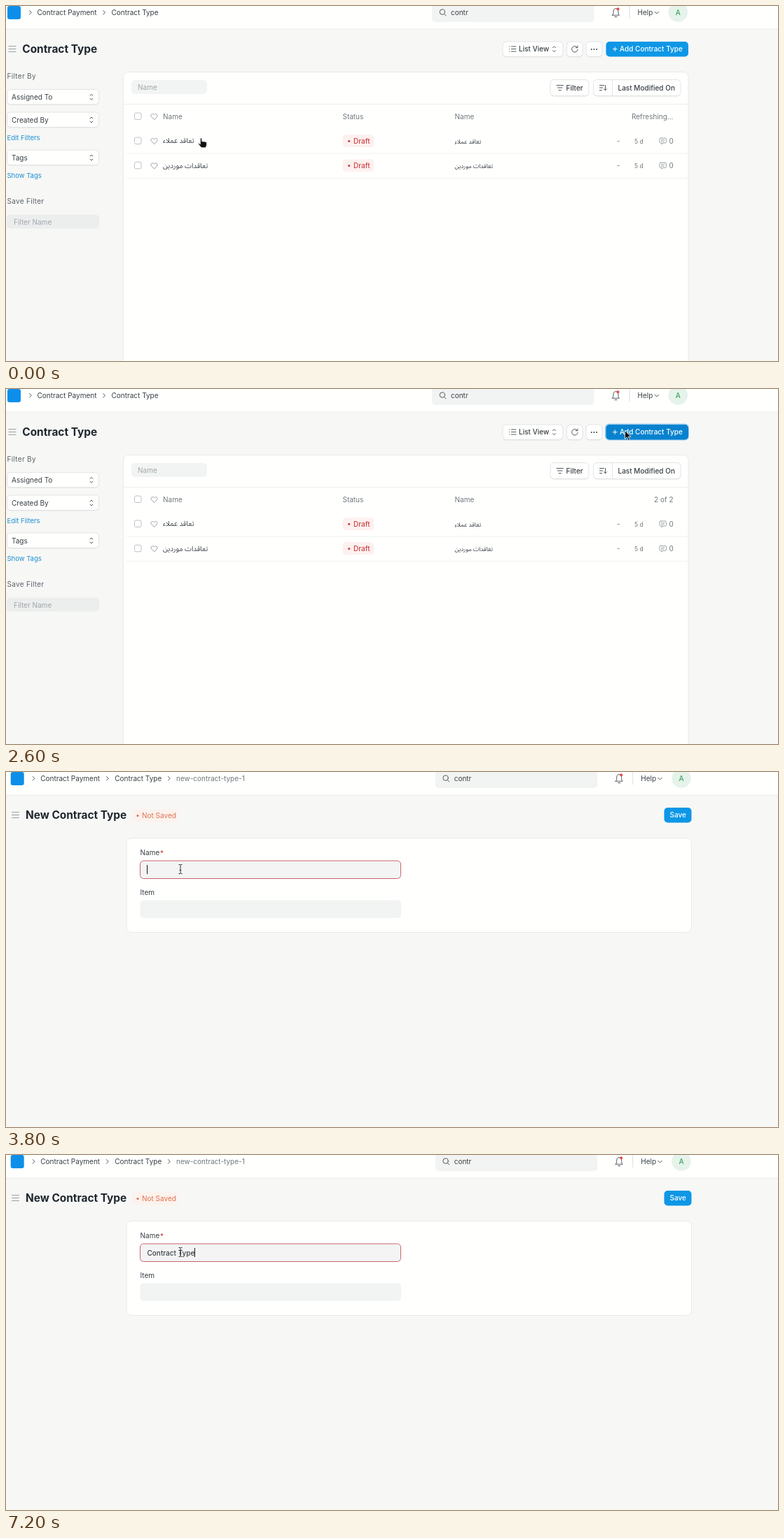
An HTML page for the animation above (8 s loop, 1102 by 508 pixels).

```html
<!DOCTYPE html>
<html lang="en">
<head>
<meta charset="utf-8">
<title>Contract Type</title>
<style>
html, body { margin: 0; width: 100%; height: 100%; overflow: hidden; background: #f7f7f6; }
svg { display: block; width: 1102px; height: 508px; }
text { font: 400 10px Inter, sans-serif; fill: #383f45; white-space: pre; }
.mid { font-weight: 500; }
.title { font-weight: 700; font-size: 15.4px; fill: #1f272e; }
.grey { fill: #70777d; }
.pale { fill: #a0a6aa; }
.side { fill: #5b6268; letter-spacing: .3px; }
.link { fill: #1b8fd0; font-size: 9.5px; }
.white { fill: #fff; font-weight: 500; }
.red { fill: #cf4044; font-weight: 500; }
.orange { fill: #e2714f; }
.small { font-size: 8.5px; }
.ar { font-family: "Noto Sans Arabic", "DejaVu Sans", sans-serif; }
.line { fill: none; stroke: #50585e; stroke-linecap: round; stroke-linejoin: round; }
.soft { stroke: #9aa1a6; }
</style>
</head>
<body>
<svg id="stage" viewBox="0 0 1102 508"></svg>
<script>
const text = (x, cy, str, cls = "") => `<text x="${x}" y="${cy + 3.6}" class="${cls}">${str}</text>`;
const rect = (x, y, w, h, r, fill, extra = "") =>
  `<rect x="${x}" y="${y}" width="${w}" height="${h}" rx="${r}" fill="${fill}" ${extra}/>`;
const path = (d, cls = "") => `<path class="line ${cls}" d="${d}"/>`;
const group = (id, body, x = 0) => `<g id="${id}" transform="translate(${x} 0)">${body}</g>`;
const button = (x, y, w, h) =>
  rect(x + .5, y + 1, w - 1, h - 1, 5, "#e3e5e5") + rect(x + .5, y + .5, w - 1, h - 1.5, 5, "#fffffe", 'stroke="#e2e4e4"');
const updown = (x, y) => path(`M${x - 2} ${y - 2}l2-2l2 2M${x - 2} ${y + 2}l2 2l2-2`);
const burger = x => path(`M${x} 57.5h10M${x} 61.5h10M${x} 65.5h10`, "soft");
const crumb = x => path(`M${x} 6.5l2.7 2.8l-2.7 2.8`);
const card = (x, y, w, h) => rect(x + .5, y + .5, w - 1, h, 7, "#fffffe", 'stroke="#e8eaea"');

const header = rect(-10, 0, 1122, 32.5, 0, "#fffffe") + rect(-10, 32.5, 1122, 1, 0, "#ebeded");
const nav =
  rect(2, 0, 19, 19, 3, "#0d8fe9") +
  crumb(33.5) + text(44.5, 9.2, "Contract Payment") +
  crumb(138.8) + text(150.5, 9.2, "Contract Type") +
  rect(608, -8, 231.5, 31, 5, "#f2f4f3") +
  `<circle class="line" cx="622.8" cy="8.5" r="3.7"/>` + path("M625.6 11.4l2.5 2.5") +
  text(635, 9.8, "contr") +
  path("M865.5 13.2h10c-1.5-1.4-1.5-2.5-1.5-5c0-3-1.4-4.7-3.5-4.7s-3.5 1.7-3.5 4.7c0 2.500 0 3.600-1.500 5zM869 15.500h3") +
  `<circle cx="873.5" cy="4.300" r="2" fill="#e24c4c"/>` +
  rect(889.500, 0, 1, 18, 0, "#dcdfdf") + text(901.500, 9.2, "Help") + path("M926 8.200l2.800 2.800l2.800-2.800") +
  `<circle cx="959.300" cy="9" r="13.800" fill="#e6f3ea"/>` + text(955.800, 9.400, "A", "mid green");

const select = (y, label) => button(1, y - 11.500, 132, 23) + text(8, y, label) + updown(122, y);
const sidebar =
  text(1.500, 100.700, "Filter By", "side") + select(130.300, "Assigned To") + select(163, "Created By") +
  text(1.500, 188, "Edit Filters", "link") + select(217, "Tags") + text(1.500, 242.700, "Show Tags", "link") +
  text(1.500, 279.800, "Save Filter", "side") + rect(1, 298.500, 132, 20, 5, "#eceeee") +
  text(11, 309, "Filter Name", "pale");

const rowStart = y => rect(183.500, y - 5, 9.500, 9.500, 2, "#fffffe", 'stroke="#bcc2c6"') +
  path(`M211.500 ${y + 4.500}l-3.900-4c-2.200-2.800 1.600-5.800 3.900-2.700c2.300-3.100 6.100-.100 3.900 2.700z`, "soft");
const row = (y, name) => rowStart(y) +
  text(224, y - .300, name, "ar mid") +
  rect(480.500, y - 9, 45, 18, 5, "#fdf1f0") + `<circle cx="489.700" cy="${y + .300}" r="1.600" fill="#cf4044"/>` +
  text(496, y, "Draft", "red") + text(640.500, y + .500, name, "ar small") +
  text(872, y, "-", "grey") + text(897, y, "5 d", "grey small") +
  path(`M934.500 ${y - 4}h6.500q1.500 0 1.500 1.500v4q0 1.500-1.500 1.500h-3l-2 2v-2h-1.500q-1.500 0-1.500-1.500v-4q0-1.500 1.500-1.500zM935.500 ${y - 1.300}h4.500M935.500 ${y + .900}h3`, "soft") +
  text(946.500, y, "0", "grey") + rect(172, y + 17.500, 801, 1, 0, "#efefef");

const list =
  burger(4) + text(23.300, 63.300, "Contract Type", "title") + sidebar +
  button(708.500, 50.500, 87, 23) +
  path("M721.500 58h6.500M721.500 61.500h6.500M721.500 65h6.500M718.500 58h.1M718.500 61.500h.1M718.500 65h.1") +
  text(732, 61.700, "List View", "mid") + updown(782.500, 61.700) +
  button(800, 50.500, 23.500, 23) + path("M815.600 59.500a4.300 4.300 0 1 0 .600 3M816 57v2.700h-2.700") +
  button(827.500, 50.500, 24, 23) +
  [835.800, 839.500, 843.200].map(x => `<circle cx="${x}" cy="62" r="1" fill="#383f45"/>`).join("") +
  rect(855, 49.500, 120, 24, 6, "#9fcdec", 'id="ring"') + rect(856.500, 51, 117.500, 21.500, 5, "#0d97e6", 'id="add"') +
  `<path d="M866 61.700h6.500M869.250 58.450v6.500" stroke="#fff"/>` + text(876, 61.700, "Add Contract Type", "white") +
  card(167, 94, 807.500, 430) + rect(179, 106, 108, 20, 5, "#f2f4f3") + text(188, 116.200, "Name", "pale") +
  button(776.500, 105, 56, 24.500) + path("M786 113.500h9.500M787.500 117h6.500M789.200 120.500h3") + text(799.500, 117, "Filter", "mid") +
  button(838, 105, 125.500, 24.500) + rect(865, 105.500, 1, 23.500, 0, "#e2e4e4") +
  path("M847.500 113.500h6M847.500 117h4M847.500 120.500h3M855.500 113.500v7M853.500 118.700l2 2l2-2") +
  text(873.500, 117, "Last Modified On", "mid") +
  rect(168, 140, 806, 1, 0, "#ededed") + rowStart(158) +
  text(224, 158, "Name", "grey") + text(480.500, 158, "Status", "grey") + text(640.500, 158, "Name", "grey") +
  `<text id="count" class="grey" x="952.500" y="161.600" text-anchor="end"></text>` +
  row(193, "تعاقد عملاء") + row(228.300, "تعاقدات موردين");

const form =
  crumb(231.500) + text(243, 9.200, "new-contract-type-1", "grey") +
  burger(8.500) + text(28, 63.300, "New Contract Type", "title") +
  rect(180, 53, 66.500, 18.500, 6, "#fcf2ed") + `<circle cx="188" cy="62.500" r="1.600" fill="#e2714f"/>` +
  text(194, 62.300, "Not Saved", "orange") +
  rect(939.500, 51, 39, 21.500, 5, "#0d97e6") + text(947.500, 61.700, "Save", "white") +
  card(171.500, 94, 807.500, 135) + text(191.500, 115.500, "Name") + text(219.800, 116.500, "*", "red") +
  rect(191.500, 127, 372, 25.500, 5, "#f3f4f3", 'stroke="#c9636c"') +
  text(191.500, 172.500, "Item") + rect(191.500, 183.500, 372.500, 25.500, 5, "#f2f4f3") +
  `<text id="typed" class="mid" x="201.500" y="143.500"></text>` + rect(201, 133, 1.100, 13, 0, "#222", 'id="caret"');

const outline = 'fill="#111" stroke="#fff" stroke-width=".8" stroke-linejoin="round"';
const cursors =
  `<path id="arrow" d="M0 0v12l2.800-2.500l2.100 4.700l2-.900l-2.100-4.600h3.800z" ${outline}/>` +
  `<path id="hand" d="M-1.200 1q1.200-2 2.400 0v4q1-.900 2.300 0q1.200-.600 2.300.400q2-.400 2.200 1.200v3.400l-1.400 3.800h-6.200l-4.200-5q-.700-1.700 1-1.300l1.600 1.300z" ${outline}/>` +
  `<path id="beam" d="M-2.500-6.500h1.800l.7.700l.7-.700h1.800M0-5.800v11.600M-2.500 6.500h1.800l.7-.700l.7.700h1.800M-1.300 1.500h2.600" fill="none" stroke="#333"/>`;

const stage = document.getElementById("stage");
stage.innerHTML = header + group("nav", nav) + group("list", list) + group("form", form) + cursors;
const $ = id => document.getElementById(id);
document.querySelector(".green").style.fill = "#41a36b";

// Pointer steps: time, shape, x, y
const pointer = [
  [0, "hand", 278.500, 189], [400, "arrow", 342.500, 164.500], [600, "arrow", 460, 149],
  [700, "arrow", 568.500, 139], [900, "arrow", 684.500, 120], [1200, "arrow", 858.500, 79.500],
  [1400, "hand", 880, 64], [1600, "hand", 884, 59], [2600, "arrow", 883.500, 59.500],
  [2900, "arrow", 850, 72], [3000, "arrow", 780, 100], [3100, "arrow", 690, 130],
  [3200, "arrow", 610, 148], [3300, "beam", 554, 141], [3500, "beam", 249, 139],
  [4700, "none", 0, 0], [5200, "beam", 249, 139]
];
// Typing steps: time, letters shown
const typing = [[0, 0], [4500, 1], [4700, 2], [4900, 3], [5100, 4], [5200, 5], [5700, 7],
  [5900, 8], [6100, 9], [6800, 11], [7000, 12], [7200, 13]];

const at = (steps, t) => steps.filter(s => s[0] <= t).pop();
const show = (id, on) => $(id).style.display = on ? "" : "none";

function draw(t) {
  const isForm = t >= 2700, pressed = t >= 2500;
  show("list", !isForm);
  show("form", isForm);
  $("nav").setAttribute("transform", `translate(${isForm ? 4.700 : 0} 0)`);
  $("count").textContent = t < 100 ? "Refreshing..." : "2 of 2";
  show("ring", pressed);
  $("add").setAttribute("fill", pressed ? "#0782cf" : "#0d97e6");

  const [, shape, x, y] = at(pointer, t);
  for (const id of ["arrow", "hand", "beam"]) show(id, id === shape);
  if (shape !== "none") $(shape).setAttribute("transform", `translate(${x} ${y})`);

  const typed = $("typed");
  typed.textContent = "Contract Type".slice(0, at(typing, t)[1]);
  $("caret").setAttribute("x", 201 + (isForm ? typed.getComputedTextLength() : 0));
  show("caret", !(t >= 3200 && t < 3800 || t >= 4400 && t < 4500));
}

let start;
function tick(now) {
  start ??= now;
  draw((now - start) % 8000);
  requestAnimationFrame(tick);
}
draw(0);
requestAnimationFrame(tick);
</script>
</body>
</html>
```
